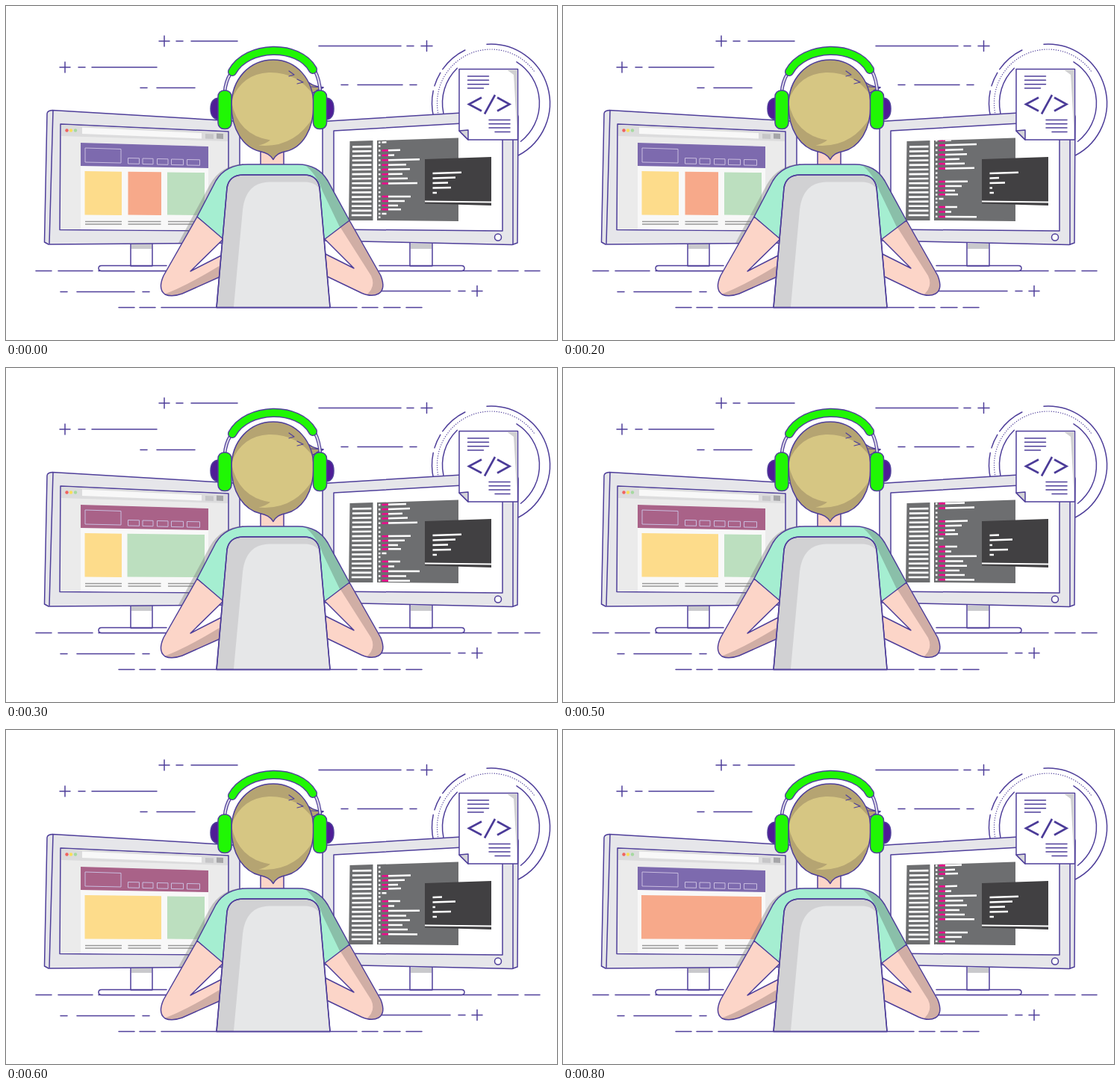
Recreate the animation shown at these times as an HTML page. Size 738 by 447 pixels, loop 900 ms.

```html
<!DOCTYPE html>
<html lang="en">
<head>
<meta charset="utf-8">
<title>Programmer at two screens</title>
<style>
  html, body { margin: 0; width: 100%; height: 100%; overflow: hidden; background: #fff; }
  svg { display: block; width: 738px; height: 447px; }
  .ink { stroke: #4f3f9a; stroke-width: 1.5; stroke-linejoin: round; stroke-linecap: round; }
  .thin { stroke-width: 1.2; }
  .line { fill: none; }
  .case { fill: #e6e6ea; }
  .skin { fill: #fcd5c8; }
  .skinShade { fill: #d0aea5; }
  .green { fill: #20f704; }
  .grey { fill: #6d6e70; }
</style>
</head>
<body>
<svg viewBox="0 0 738 447">
  <defs>
    <clipPath id="editorClip"><path d="M497 180L606 176.500V288L497 287Z"/></clipPath>
    <clipPath id="headClip"><path id="headShape" d="M358 205.500C354 199 349 196.500 340 194.500C317 189 302 164 302 133C302 98 326 72 358 72C389 72 412 98 412 133C412 164 398 189 375 194.500C366 196.500 361 199 358 205.500Z"/></clipPath>
    <clipPath id="leftArmClip"><path id="leftArm" d="M256 282L211 361Q203 379 213 386Q222 390 236 385L292 360V332L247 355L292 311Z"/></clipPath>
    <clipPath id="rightArmClip"><path id="rightArm" d="M460 287L502 361Q509 379 499 385Q490 390 476 384L426 360V331L466 351L424 309Z"/></clipPath>
    <clipPath id="shirtClip"><path id="shirt" d="M256 282L281 234Q294 212 324 212H391Q418 212 431 234L460 287L427 312H291Z"/></clipPath>
  </defs>

  <!-- Background strokes -->
  <path class="ink line" d="M205 47h14m-7-7v14M228 47h9M248 47h62M72 82h14m-7-7v14M97 82h9M115 82h87
    M180 109.500h9M202 109.500h51M419 53.500h110M537 53.500h9M556 53.500h15m-7.500-7v14M449 105.500h9M471 105.500h60M541 105.500h9
    M40 354.500h21M70 354.500h46M124 354.500h91M500 354.500h150M659 354.500h27M695 354.500h20
    M73 382.500h9M95 382.500h77M183 382.500h9M503 381.500h92M606 381.500h9M624 381.500h14m-7-7v14
    M151 403.500h21M179 403.500h21M208 403.500h262M477 403.500h21M506 403.500h22M536 403.500h21"/>
  <g id="rings" class="ink line"></g>

  <!-- Left monitor -->
  <path class="ink" fill="#fff" d="M167 316h29v32h-29zM215 347.500H128q-4 0-4 3.500t4 3.500h87"/>
  <path fill="#c9c9cc" d="M168 318h27v7h-27z"/>
  <path class="ink case" d="M62 139.500L313 154.500V317L57 319L51.500 316L55 144Q55.500 140 62 139.500Z"/>
  <path class="ink line" d="M63 140L58 318"/>
  <path class="ink" fill="#ebebeb" d="M73 158L298 168V301L72 299.500Z"/>
  <path fill="#dcdcdd" d="M74 159L297 169V181L74 174Z"/>
  <path fill="#f8f8f8" d="M102 162.500L262 170V177.500L102 171ZM100 183L271 188V300L100 299Z"/>
  <path fill="#c6c6c8" d="M267 171l11 .500v6.500l-11-.500z"/>
  <path fill="#a5a5a8" d="M282 170.500l9 .500v7l-9-.500z"/>
  <circle cx="81.500" cy="166.500" r="2.200" fill="#f0625f"/>
  <circle cx="87" cy="166.500" r="2.200" fill="#f8e05a"/>
  <circle cx="93" cy="166.500" r="2.200" fill="#a5d9a0"/>
  <path id="banner" d="M100 183L271 188V217L100 214Z"/>
  <path fill="none" stroke="#c9bddf" d="M106 190L154 191.500V210L106 209ZM163.500 203.500l15 .300v7.500l-15-.300z
    M183 204l14 .300v7.500l-14-.300zM202.500 204.500l14.500 .300v7.500l-14.500-.300zM221.500 205l16 .300v7.500l-16-.300zM242.500 205.500l17 .300v7.500l-17-.300z"/>
  <g id="cards"></g>
  <path fill="none" stroke="#999" stroke-width="1.500" d="M106 288.500h49m-49 3.500h49M163.500 288.500h44m-44 3.500h44M217 288.500h49m-49 3.500h49"/>

  <!-- Right monitor -->
  <path class="ink" fill="#fff" d="M541 316h30v32h-30zM500 347.500h110q4 0 4 3.500t-4 3.500H500"/>
  <path fill="#c9c9cc" d="M542 318h28v7h-28z"/>
  <path class="ink case" d="M424 154.500L676 139Q685 140 686 148L685 317L678 319.500L424 314Z"/>
  <path class="ink line" d="M679 140V319"/>
  <path class="ink" fill="#fff" d="M439 167L665 154V301L439 299Z"/>
  <circle class="ink" cx="659" cy="309.500" r="4.500" fill="#fff"/>
  <path class="grey" d="M460.500 181L491.500 180V287L459 287ZM497 180L606 176.500V288L497 287Z"/>
  <g id="sidebar" stroke="#fff" stroke-width="2.600"></g>
  <g id="code" clip-path="url(#editorClip)" stroke-width="2.500"></g>
  <path fill="#414042" d="M561 205L650 202V267L561 264.500Z"/>
  <path stroke="#fff" stroke-width="1.800" d="M561 261.500L650 262.500"/>
  <g id="terminal" stroke="#fff" stroke-width="2.500"></g>

  <!-- Document -->
  <path class="ink" fill="#fff" d="M607 84.500H685.500V179H619L607 167Z"/>
  <path fill="#d0d0d2" d="M671 85.500H684.500V168L680 92Z"/>
  <path class="ink" fill="#d5d5d8" d="M607 167L619 166V179Z"/>
  <path class="ink line" d="M618.500 94h28m-28 5.300h28m-28 5.400h28m-28 5.300h21M647 152.500h28m-28 5.300h28m-28 5.300h28M655 168.500h20"/>
  <path class="line" stroke="#4b3b98" stroke-width="2.600" d="M637 122.500L620 131.500L637 140.500M655 119L641 144.500M658 122.500L674.500 131.500L658 140.500"/>

  <!-- Programmer -->
  <path fill="#777" fill-opacity=".38" d="M318 211Q288 213 273 239L231 317H250L290 245Z"/>
  <use href="#leftArm" class="skin"/>
  <path class="skinShade" clip-path="url(#leftArmClip)" d="M205 388Q235 379 292 344V395H205Z"/>
  <use href="#leftArm" class="ink line"/>
  <use href="#rightArm" class="skin"/>
  <path class="skinShade" clip-path="url(#rightArmClip)" d="M447 295L489 361Q497 378 478 390H520V280H460Z"/>
  <use href="#rightArm" class="ink line"/>
  <path class="ink skin" d="M341 190H372V215H341Z"/>
  <use href="#shirt" fill="#a5eed1"/>
  <path fill="#8abfa9" clip-path="url(#shirtClip)" d="M396 210Q415 222 424 248L449 300L470 287L425 210Z"/>
  <use href="#shirt" class="ink line"/>
  <path class="ink" fill="#d1d1d3" d="M282 403.500L296 243Q299 226 318 226H399Q417 226 420 243L434 403.500Z"/>
  <path fill="#e6e7e8" d="M305 402.500L317 273Q321 236 353 235.500H400Q418 236 419.500 248L433 402.500Z"/>
  <path class="ink line" d="M282 403.500L296 243Q299 226 318 226H399Q417 226 420 243L434 403.500Z"/>

  <path class="ink" fill="#b5a472" d="M399 97Q409 108 425 109L410 117Z"/>
  <use href="#headShape" fill="#d6c683"/>
  <g clip-path="url(#headClip)" fill="#b5a472">
    <path d="M300 132Q313 91 352 89Q391 88 413 121V65H300Z"/>
    <path d="M302 128Q311 173 354 179.500Q347 185 338 186.500Q387 191 413 146V210H300Z"/>
  </g>
  <use href="#headShape" class="ink line"/>
  <path class="ink line thin" d="M379 87l7 5-7 2M390 98l8 4-8 2M409 108l16 1-9 4"/>

  <path class="line" stroke="#4f3f9a" stroke-width="4.600" d="M301 90Q294 101 293 115M414 87Q420 99 421 115"/>
  <path class="line" stroke="#dcd7e8" stroke-width="2.200" d="M301 90Q294 101 293 115M414 87Q420 99 421 115"/>
  <g fill="none" stroke-linecap="round">
    <path stroke="#4f3f9a" stroke-width="12.200" d="M303 88C323 51.500 392 50.500 411 85"/>
    <path stroke="#20f704" stroke-width="9.400" d="M303 88C323 51.500 392 50.500 411 85"/>
  </g>
  <path class="ink" fill="#4f1d96" d="M285 123Q274 124 274 137.500T285 152ZM429 123Q439 124 439 137.500T429 152Z"/>
  <rect class="ink green" x="284" y="113" width="18" height="51.500" rx="8"/>
  <rect class="ink green" x="411.500" y="113" width="18" height="51.500" rx="8"/>
</svg>

<script>
const byId = id => document.getElementById(id);
const path = (d, attrs = '') => `<path d="${d}" ${attrs}/>`;

// Arcs around the document: radius, start and end in degrees, optional dash.
function arc(radius, from, to, dash = '') {
  const point = deg => {
    const a = deg * Math.PI / 180;
    return `${649.5 + radius * Math.cos(a)} ${130 + radius * Math.sin(a)}`;
  };
  const large = to - from > 180 ? 1 : 0;
  return path(`M${point(from)}A${radius} ${radius} 0 ${large} 1 ${point(to)}`,
    dash && `class="thin" stroke-dasharray="${dash}"`);
}
byId('rings').innerHTML =
  arc(79, -94, 62) + arc(79, 166, 192) + arc(79, 197, 211) + arc(79, 215, 244) +
  arc(72, 165, 324, '.3 2.8') + arc(65, -58, 52) + arc(65, 168, 226);

// A horizontal line on the angled editor plane; y is its height near the left margin.
function codeLine(x1, x2, y, color) {
  const slope = -.032 + (y - 180) * .00038;
  const at = x => y + (x - 520) * slope;
  return path(`M${x1} ${at(x1)}L${x2} ${at(x2)}`, `stroke="${color}"`);
}
byId('sidebar').innerHTML = Array.from({ length: 16 }, (_, i) => {
  const y = 188.5 + i * 6.1;
  return path(`M${464 - i * .08} ${y}L489.500 ${y - .4 + i * .03}`);
}).join('');

const PERIOD = 96;
const ROW_Y = [187, 193, 199.5, 206, 212.5, 218.7, 225, 231, 237.3, 243.3, 249.2, 255, 261, 267, 272.3, 278];
const ROW_END = [0, 528, 520, 554, 536, 541, 531, 538, 551, 0, 0, 542, 534, 525, 529, 509];

function drawCode(step) {
  let out = '';
  for (let copy = -1; copy < 3; copy++) {
    ROW_Y.forEach((base, i) => {
      const y = base + copy * PERIOD - step * 10;
      if (y < 174 || y > 292) return;
      const end = ROW_END[i];
      out += codeLine(499, 501.5, y, '#fff');
      if (end > 510) out += codeLine(503.5, 512, y, '#ed0a8c') + codeLine(512, end, y, '#fff');
      else if (end) out += codeLine(503.5, end + .5, y, '#fff');
    });
  }
  byId('code').innerHTML = out;
}

const YELLOW = '#fddc8b', ORANGE = '#f7a98a', GREEN = '#bcdfbf';
const PURPLE = '#7d6aae', MAGENTA = '#a96288';
const LAYOUTS = [
  { banner: PURPLE, cards: [[105.5, 155, YELLOW], [163.5, 208, ORANGE], [216, 266, GREEN]] },
  { banner: MAGENTA, cards: [[105.5, 155, YELLOW], [162.5, 266, GREEN]] },
  { banner: MAGENTA, cards: [[105.5, 208, YELLOW], [216, 266, GREEN]] },
  { banner: PURPLE, cards: [[105, 266, ORANGE]] },
];
const LAYOUT_AT = [0, 0, 0, 1, 1, 2, 2, 3, 3];

function drawPage(step) {
  const { banner, cards } = LAYOUTS[LAYOUT_AT[step]];
  const top = x => 221 + (x - 105) * .013;
  byId('banner').setAttribute('fill', banner);
  byId('cards').innerHTML = cards.map(([x1, x2, color]) =>
    path(`M${x1} ${top(x1)}L${x2} ${top(x2)}V280L${x1} 279.500Z`, `fill="${color}"`)).join('');
}

const OUTPUTS = [
  [610, 602, 592, 596, 577],
  [610, 584, 592, 575, 577],
  [584, 602, 575, 596, 577],
];
const OUTPUT_AT = [0, 1, 1, 0, 0, 2, 2, 2, 0];

function drawTerminal(step) {
  byId('terminal').innerHTML = OUTPUTS[OUTPUT_AT[step]].map((end, i) => {
    const y = 224 + i * 6.5;
    return path(`M571.500 ${y}L${end} ${y - (end - 571) * (.034 - i * .005)}`);
  }).join('');
}

let shown = -1;
function render(now) {
  const step = Math.floor(now % 900 / 100);
  if (step !== shown) {
    shown = step;
    drawCode(step);
    drawPage(step);
    drawTerminal(step);
  }
  requestAnimationFrame(render);
}
render(0);
</script>
</body>
</html>
```
